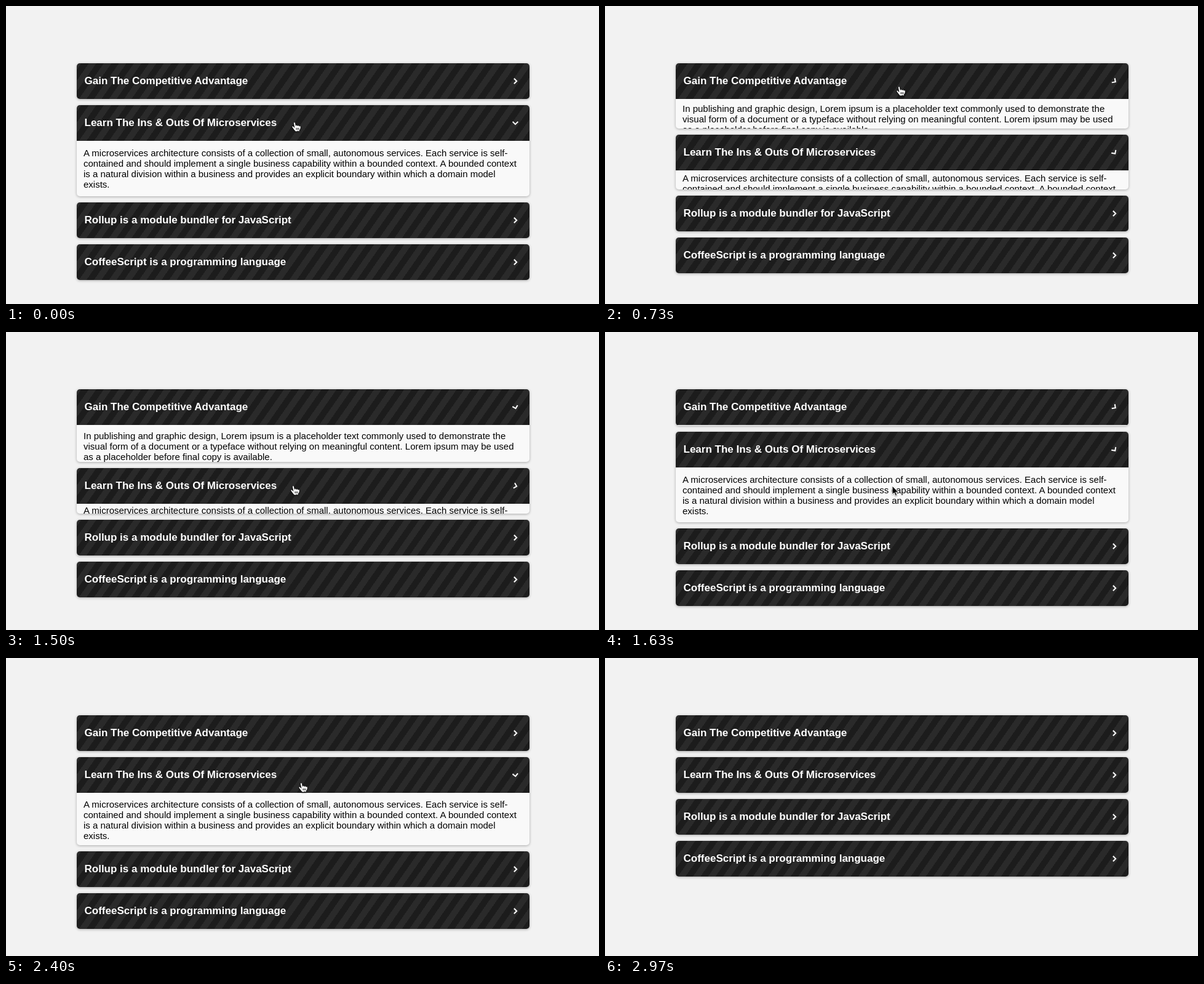
An HTML page that plays this animation: 964 by 484 pixels, repeating every 3860 ms.

```html
<!DOCTYPE html>
<html lang="en">
<head>
<meta charset="utf-8">
<title>Accordion</title>
<style>
  html, body { margin: 0; width: 100%; height: 100%; overflow: hidden; background: #f2f2f2; }
  body { position: relative; font-family: "Liberation Sans", Helvetica, Arial, sans-serif; }
  #list { position: absolute; left: 115px; top: 93px; width: 736px; }
  .item { margin-bottom: 10px; border-radius: 5px; overflow: hidden; background: #f9f9f9;
          box-shadow: 0 1px 4px rgba(0, 0, 0, .3); }
  .head { position: relative; height: 58px; padding-left: 12.5px; color: #fff; font: bold 17px/57px "Liberation Sans", Helvetica, Arial, sans-serif;
          background: repeating-linear-gradient(-55deg, #1c1c1c, #1c1c1c 10px, #2a2a2a 10px, #2a2a2a 20px); }
  .head svg { position: absolute; right: 13px; top: 19px; }
  .panel { box-sizing: border-box; padding: 0 11px; overflow: hidden; white-space: pre; color: #000;
           font-size: 15px; line-height: 17px; }
  svg { overflow: visible; fill: none; }
  #cursor { position: absolute; left: 0; top: 0; filter: drop-shadow(0 1px 1px rgba(0, 0, 0, .35)); }
</style>
</head>
<body>
<div id="list"></div>
<svg id="cursor" width="20" height="20">
  <g id="hand" transform="scale(.93)" stroke="#000" stroke-width=".9" stroke-linejoin="round">
    <path fill="#fff" d="M-1 13L-4.2 8.6C-5 7.2 -3.2 5.6 -1.7 7.2L-.2 9L-1.6 2C-2 -.6 .9 -.9 1.5 1.4L2.5 5.8C2.6 4 5.2 4 5.5 6.2C6 4.6 8.2 4.8 8.4 6.8C9.2 5.6 11 5.8 11 7.8C11.2 11 10 12 8.8 14L8.7 16H7L6 14.8L5 16H1L.8 14.8Z"/>
    <path d="M3.2 9.5v3.6M5.3 9.5v3.6M7.4 9.5v3.6"/>
  </g>
  <path id="arrow" fill="#000" stroke="#fff" d="M0 0V14L3.2 11L5.4 16.2L7.7 15.2L5.5 10.2H10Z"/>
</svg>
<script>
const HEAD = 58, GAP = 10, TOP = 93, PAD = 11, LINE = 17;
const LOOP = 3860, SLIDE = 200, TURN = 290, TURN_DELAY = 10;

// flips: times at which an item toggles, starting with opening
const items = [
  { title: 'Gain The Competitive Advantage', flips: [611, 1445], lines: [
    'In publishing and graphic design, Lorem ipsum is a placeholder text commonly used to demonstrate the',
    'visual form of a document or a typeface without relying on meaningful content. Lorem ipsum may be used',
    'as a placeholder before final copy is available.'] },
  { title: 'Learn The Ins & Outs Of Microservices', flips: [-1000, 611, 1445, 2370], lines: [
    'A microservices architecture consists of a collection of small, autonomous services. Each service is self-',
    'contained and should implement a single business capability within a bounded context. A bounded context',
    'is a natural division within a business and provides an explicit boundary within which a domain model',
    'exists.'] },
  { title: 'Rollup is a module bundler for JavaScript', flips: [], lines: [] },
  { title: 'CoffeeScript is a programming language', flips: [], lines: [] }
];

// pointer stops: time, x, y
const stops = [
  [20, 469, 189], [400, 478, 128], [590, 478, 128], [690, 478, 131], [800, 478, 131],
  [1090, 467, 250], [1880, 467, 250], [2030, 480, 203], [2850, 480, 203], [2945, 717, 75]
];
const POINTER_GONE = 2970;

const byId = id => document.getElementById(id);
const clamp = v => Math.min(1, Math.max(0, v));
const swing = v => .5 - Math.cos(Math.PI * clamp(v)) / 2;

for (const item of items) {
  const box = document.createElement('div');
  box.className = 'item';
  box.innerHTML = `<div class="head"><span></span><svg width="20" height="20">
    <path stroke="#fff" stroke-width="2" d="M-2.1 -4.3L2.2 0L-2.1 4.3"/></svg></div><div class="panel"></div>`;
  box.querySelector('span').textContent = item.title;
  item.icon = box.querySelector('path');
  item.panel = box.querySelector('.panel');
  item.panel.textContent = item.lines.join('\n');
  byId('list').append(box);
}

function openness(flips, t, curve) {
  const n = flips.filter(f => f <= t).length;
  if (!n) return 0;
  const p = curve(t - flips[n - 1]);
  return n % 2 ? p : 1 - p;
}

function pointerAt(t) {
  let [, x, y] = stops[0];
  for (let i = 1; i < stops.length; i++) {
    const [t0, x0, y0] = stops[i - 1], [t1, x1, y1] = stops[i];
    if (t < t0) break;
    const p = swing((t - t0) / (t1 - t0));
    x = x0 + (x1 - x0) * p;
    y = y0 + (y1 - y0) * p;
  }
  return [x, y];
}

function draw(t) {
  const [x, y] = pointerAt(t);
  let top = TOP, overHead = false;
  for (const { flips, lines, icon, panel } of items) {
    const open = openness(flips, t, d => swing(d / SLIDE));
    const turn = openness(flips, t, d => clamp((d - TURN_DELAY) / TURN));
    const height = open * (lines.length * LINE + 2 * PAD);
    panel.style.height = height + 'px';
    panel.style.paddingTop = open * PAD + 'px';
    panel.style.display = height ? 'block' : 'none';
    icon.setAttribute('transform', `translate(10 10) rotate(${90 * turn})`);
    overHead ||= y >= top && y < top + HEAD;
    top += HEAD + height + GAP;
  }
  byId('cursor').style.transform = `translate(${Math.round(x)}px, ${Math.round(y)}px)`;
  byId('cursor').style.display = t < POINTER_GONE ? 'block' : 'none';
  byId('hand').style.display = overHead ? 'inline' : 'none';
  byId('arrow').style.display = overHead ? 'none' : 'inline';
}

const start = performance.now();
function tick() {
  draw((performance.now() - start) % LOOP);
  requestAnimationFrame(tick);
}
tick();
</script>
</body>
</html>
```
